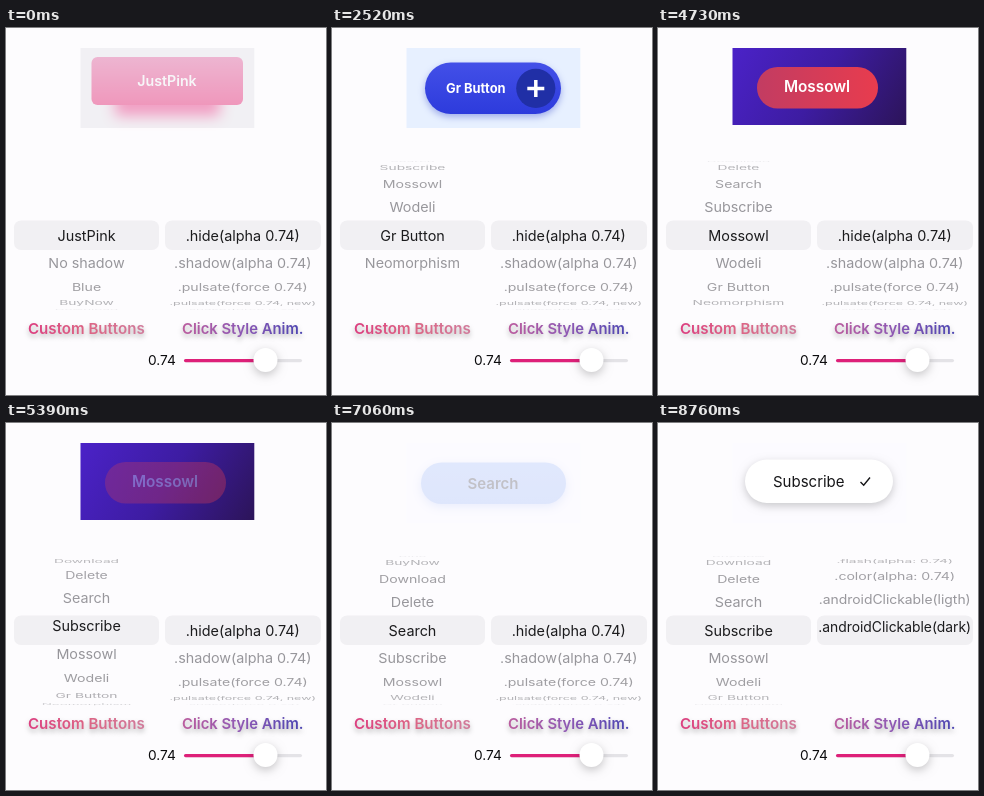
Write an HTML page with a canvas that moves like this. It is 320 px wide and 367 px high and loops after 8790 ms.

```html
<!DOCTYPE html>
<html lang="en">
<head>
<meta charset="utf-8">
<title>Button styles</title>
<style>
html, body { margin: 0; width: 100%; height: 100%; overflow: hidden; background: #fdfcfe; }
canvas { display: block; width: 320px; height: 367px; }
</style>
</head>
<body>
<canvas id="stage"></canvas>
<script>
const W = 320, H = 367, LOOP = 8790;
const canvas = document.getElementById('stage');
const ctx = canvas.getContext('2d');
const ratio = Math.max(1, window.devicePixelRatio || 1);
canvas.width = W * ratio;
canvas.height = H * ratio;

const FONT = 'Inter, Roboto, "Liberation Sans", sans-serif';
const BG = '#fdfcfe', PINK = '#de2079';
const MID = 207.4, RADIUS = 74, STEP = 0.385;
const LIST_TOP = 129, LIST_BOTTOM = 286;
const BAND = { y: 192.5, h: 29.5 };

const styles = ['JustPink', 'No shadow', 'Blue', 'BuyNow', 'Download', 'Delete',
  'Search', 'Subscribe', 'Mossowl', 'Wodeli', 'Gr Button', 'Neomorphism'];
const clicks = ['.hide(alpha 0.74)', '.shadow(alpha 0.74)', '.pulsate(force 0.74)',
  '.pulsate(force 0.74, new)', '.shake(force 0.74)', '.shake(force 0.74, new)',
  '.flash(alpha: 0.74)', '.color(alpha: 0.74)', '.androidClickable(ligth)',
  '.androidClickable(dark)'];

// Scroll moves: start, end, target row
const styleMoves = [[100, 740, 11.32], [740, 900, 11], [1640, 1990, 10], [2930, 3240, 9],
  [4000, 4320, 8], [5170, 5470, 7], [6220, 6540, 6], [7370, 7690, 7]];
const clickMoves = [[8260, 8760, 9.11]];
// Shown button: time, name
const shown = [[0, 'pink'], [940, 'soft'], [2060, 'plus'], [3320, 'dot'], [4400, 'violet'],
  [5490, 'check'], [6620, 'search'], [7780, 'check']];
const presses = [-220, 1240, 2620, 3700, 5240, 5840, 6920, 8080];

const clamp = v => Math.max(0, Math.min(1, v));
const smooth = p => p * p * (3 - 2 * p);

function scrollAt(moves, t) {
  let pos = 0;
  for (const [start, end, target] of moves) {
    if (t < start) break;
    pos += (target - pos) * smooth(clamp((t - start) / (end - start)));
  }
  return pos;
}

function pressAlpha(t) {
  for (const start of presses) {
    const u = t - start;
    if (u >= 0 && u < 460) return u < 160 ? 1 - 0.7 * u / 160 : 0.3 + 0.7 * (u - 160) / 300;
  }
  return 1;
}

function gradient(x0, y0, x1, y1, ...colors) {
  const g = ctx.createLinearGradient(x0, y0, x1, y1);
  colors.forEach((c, i) => g.addColorStop(i / (colors.length - 1), c));
  return g;
}

function shadow(color, blur, dx, dy) {
  ctx.shadowColor = color;
  ctx.shadowBlur = blur * ratio;
  ctx.shadowOffsetX = dx * ratio;
  ctx.shadowOffsetY = dy * ratio;
}

const noShadow = () => shadow('transparent', 0, 0, 0);

function box(x, y, w, h, r, fill) {
  ctx.fillStyle = fill;
  ctx.beginPath();
  ctx.roundRect(x, y, w, h, r);
  ctx.fill();
}

function disc(x, y, r, fill) {
  ctx.fillStyle = fill;
  ctx.beginPath();
  ctx.arc(x, y, r, 0, Math.PI * 2);
  ctx.fill();
}

function line(color, width, ...pts) {
  ctx.strokeStyle = color;
  ctx.lineWidth = width;
  ctx.beginPath();
  for (let i = 0; i < pts.length; i += 2) ctx.lineTo(pts[i], pts[i + 1]);
  ctx.stroke();
}

function text(str, x, y, size, weight, fill, align = 'center') {
  ctx.font = `${weight} ${size}px ${FONT}`;
  ctx.textAlign = align;
  ctx.fillStyle = fill;
  ctx.fillText(str, x, y + size * 0.36);
}

const card = (fill, h = 80) => box(74.5, 20, 173.8, h, 0, fill);

// Each style: its card, then its button
const buttons = {
  pink: {
    card: () => card('#f1f0f4'),
    draw() {
      // The caster stays hidden behind the button
      shadow('rgba(242,45,128,0.95)', 14, 0, 26);
      box(109, 36, 105, 26, 4, '#f0478c');
      noShadow();
      box(85.5, 29, 151.5, 48, 6, gradient(0, 29, 0, 77, '#ea6ca6', '#ee2875'));
      text('JustPink', 161, 53, 14.2, 600, '#fff');
    }
  },
  soft: {
    card: () => card('#f0f0f3'),
    draw() {
      shadow('rgba(255,255,255,0.95)', 9, -5, -5);
      box(95, 38, 132, 42, 12, '#f0f0f3');
      shadow('rgba(165,165,190,0.45)', 9, 5, 5);
      box(95, 38, 132, 42, 12, '#f0f0f3');
      noShadow();
      text('Neomorphism', 161, 59, 14, 500, '#6d6d78');
    }
  },
  plus: {
    card: () => card('#e7f0ff'),
    draw() {
      shadow('rgba(50,70,200,0.4)', 7, 0, 3);
      box(93, 34.5, 136, 51.5, 26, gradient(0, 34, 0, 86, '#4350e8', '#2d3bdc'));
      noShadow();
      disc(203.8, 60.3, 19.6, '#202fa6');
      line('#fff', 3.5, 195.3, 60.5, 212.3, 60.5);
      line('#fff', 3.5, 203.8, 52, 203.8, 69);
      text('Gr Button', 114, 60.5, 12.9, 700, '#fff', 'left');
    }
  },
  dot: {
    card: () => card('#e8e7ea'),
    draw() {
      shadow('rgba(0,0,0,0.32)', 9, 0, 2);
      box(104.5, 40, 113, 41, 20.5, '#fff');
      noShadow();
      disc(129, 60.3, 10, '#4583ea');
      text('Wodeli', 154, 60.5, 11.8, 600, '#39383c', 'left');
    }
  },
  violet: {
    card: () => card(gradient(80, 10, 242, 107, '#4b22c8', '#3d1ca2', '#2c1459'), 77),
    draw() {
      box(99, 39, 121, 41.5, 20.7, gradient(99, 0, 220, 0, '#c23c62', '#e83c4e'));
      text('Mossowl', 159, 58.5, 15.3, 600, '#fff');
    }
  },
  search: {
    card: () => card('#fcfbff'),
    draw() {
      shadow('rgba(150,175,245,0.45)', 8, 0, 3);
      box(89, 39.5, 145, 41.5, 20.7, gradient(0, 39, 0, 81, '#b5cbfa', '#b0c6f8'));
      noShadow();
      text('Search', 161, 60.5, 15, 600, '#65666f');
    }
  },
  check: {
    card: () => card('#fcfbff'),
    draw() {
      shadow('rgba(0,0,0,0.2)', 9, 0, 3);
      box(87, 36.5, 148, 43.5, 21.7, '#fff');
      noShadow();
      text('Subscribe', 115, 58.5, 15, 400, '#161618', 'left');
      line('#161618', 1.4, 202.5, 59, 205.7, 62.2, 212, 54.5);
    }
  }
};

// Buttons fade as a single layer so overlapping parts stay correct
const layer = document.createElement('canvas');
layer.width = canvas.width;
layer.height = canvas.height;
const layerCtx = layer.getContext('2d');

function drawButton(t) {
  const name = shown.filter(s => t >= s[0]).pop()[1];
  const { card: drawCard, draw } = buttons[name];
  const alpha = pressAlpha(t);
  drawCard();
  if (alpha === 1) return draw();
  layerCtx.globalCompositeOperation = 'copy';
  layerCtx.drawImage(canvas, 0, 0);
  draw();
  ctx.save();
  ctx.globalAlpha = 1 - alpha;
  ctx.drawImage(layer, 0, 0, W, H);
  ctx.restore();
}

function drawRows(rows, pos, cx, ink) {
  rows.forEach((row, i) => {
    const angle = (i - pos) * STEP;
    const bend = Math.cos(angle);
    if (Math.abs(angle) > 1.56) return;
    ctx.save();
    ctx.translate(cx, MID + RADIUS * Math.sin(angle));
    ctx.scale(0.93 + 0.07 * bend, bend);
    ctx.globalAlpha = 1 - 0.7 * Math.abs(angle / 1.57) ** 3;
    ctx.font = `400 14.4px ${FONT}`;
    const size = 14.4 * Math.min(1, 153 / ctx.measureText(row).width);
    text(row, 0, 0, size, 400, ink);
    ctx.restore();
  });
}

function drawWheel(rows, pos, x, w, cx) {
  box(x, BAND.y, w, BAND.h, 7, '#f1f0f3');
  const low = BAND.y + BAND.h;
  const parts = [
    [LIST_TOP, BAND.y - 1.5, '#96959a'],
    [BAND.y - 1.5, low, '#1b1b1d'],
    [low, LIST_BOTTOM, '#96959a']
  ];
  for (const [top, bottom, ink] of parts) {
    ctx.save();
    ctx.beginPath();
    ctx.rect(x - 4, top, w + 8, bottom - top);
    ctx.clip();
    drawRows(rows, pos, cx, ink);
    ctx.restore();
  }
}

function drawFooter() {
  shadow('rgba(0,0,0,0.28)', 5, 0, 2.5);
  text('Custom Buttons', 22, 301, 15.1, 600, gradient(22, 0, 139, 0, '#dc3f80', '#dc6585', '#d17c9c'), 'left');
  text('Click Style Anim.', 176, 301, 14.8, 600, gradient(176, 0, 298, 0, '#bb5d9f', '#8d58b4', '#4a45b2'), 'left');
  noShadow();
  text('0.74', 142, 332.5, 13.7, 400, '#0c0c0e', 'left');
  box(178, 331, 118, 3.2, 1.6, '#e4e3e7');
  box(178, 331, 82, 3.2, 1.6, PINK);
  shadow('rgba(0,0,0,0.22)', 10, 0, 3);
  disc(259.5, 332, 12, '#fff');
  noShadow();
}

function render(t) {
  ctx.setTransform(ratio, 0, 0, ratio, 0, 0);
  ctx.globalAlpha = 1;
  noShadow();
  ctx.fillStyle = BG;
  ctx.fillRect(0, 0, W, H);
  drawButton(t);
  drawWheel(styles, scrollAt(styleMoves, t), 8, 145, 80.5);
  drawWheel(clicks, scrollAt(clickMoves, t), 159, 156, 236.7);
  drawFooter();
}

const begin = performance.now();
function tick() {
  render((performance.now() - begin) % LOOP);
  requestAnimationFrame(tick);
}
tick();
</script>
</body>
</html>
```
